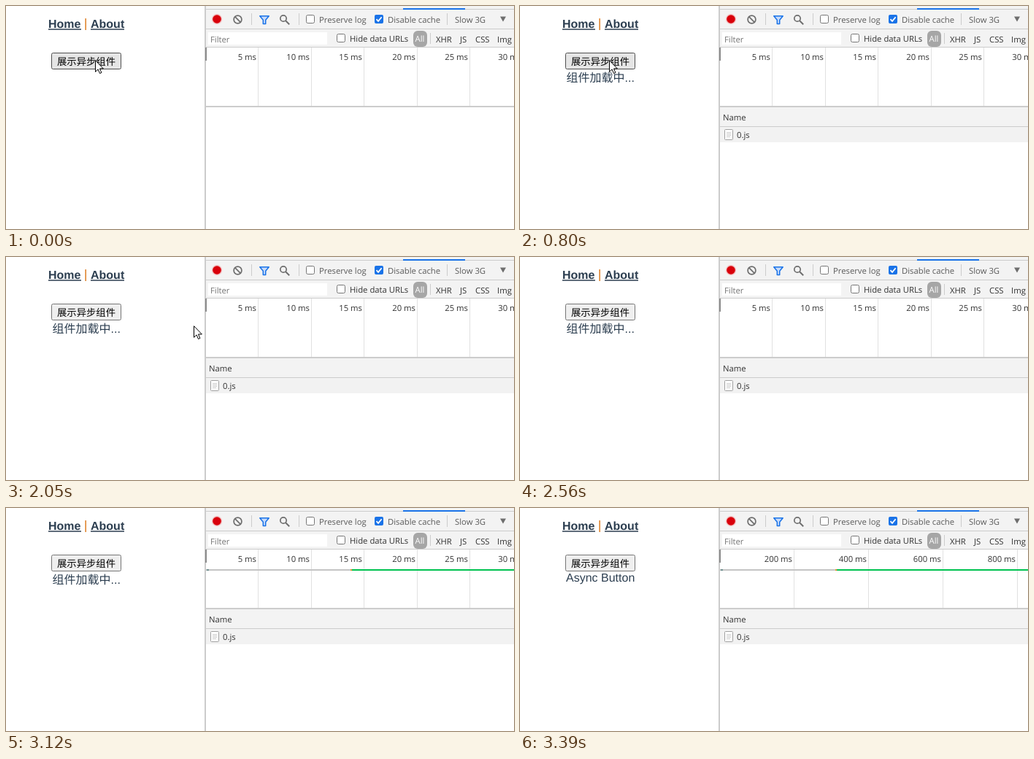
Recreate the animation shown at these times as an HTML page. Size 696 by 306 pixels, loop 4.74 s.

```html
<!DOCTYPE html>
<html lang="zh-CN">
<head>
<meta charset="utf-8">
<title>Async component</title>
<style>
  html, body { margin: 0; width: 100%; height: 100%; overflow: hidden; background: #fff; }
  svg { display: block; width: 696px; height: 306px; }
  text { white-space: pre; text-rendering: geometricPrecision; }
  .page { font: 16px "Liberation Sans", Arial, "Noto Sans CJK SC", "Noto Sans CJK", sans-serif; fill: #2c3e50; }
  .link { font-weight: bold; }
  .caption { font: 13.33px "Noto Sans CJK SC", "Noto Sans CJK", sans-serif; fill: #000; }
  .tools { font: 11.3px "Open Sans", "Noto Sans", sans-serif; fill: #333; }
  .soft { fill: #5a5a5a; }
  .sep { fill: #ccc; }
  .box { fill: #fff; stroke: #767676; }
</style>
</head>
<body>
<svg viewBox="0 0 696 306">
  <rect width="696" height="306" fill="#fff"/>

  <g class="page">
    <g class="link">
      <text x="58" y="30">Home</text>
      <text x="116" y="30">About</text>
      <path d="M58 32H103M116 32H162" stroke="#2c3e50" stroke-width="1.4"/>
    </g>
    <rect x="108.4" y="17" width="1.6" height="16" fill="#e08530"/>
    <rect id="button" x="62.5" y="64.5" width="95" height="22" rx="2"/>
    <text class="caption" x="70" y="80.5">展示异步组件</text>
    <text id="loading" x="63.5" y="104">组件加载中...</text>
    <text id="loaded" x="63" y="101">Async Button</text>
  </g>

  <g class="tools">
    <rect x="274" width="422" height="57" fill="#f3f3f3"/>
    <path class="sep" d="M274 4h422v1H274zM274 31h422v1H274zM274 56h422v1H274z"/>
    <rect x="544" y="3" width="85" height="2" fill="#1a73e8"/>

    <circle cx="289" cy="18" r="7.2" fill="#f3c4c4"/>
    <circle cx="289" cy="18" r="5.8" fill="#d9000b"/>
    <g fill="none" stroke="#6e6e6e" stroke-width="1.7">
      <circle cx="317.5" cy="18.5" r="5.4"/>
      <path d="M313.7 14.7l7.6 7.6"/>
      <circle cx="380" cy="17" r="4.2"/>
      <path d="M383.2 20.2l5 5" stroke-width="2"/>
    </g>
    <path d="M347.8 13.7h12.4l-4.5 5.6v5.2h-3.4v-5.2z" fill="#c5dafa" stroke="#1a73e8" stroke-width="1.5" stroke-linejoin="round"/>
    <path class="sep" d="M336 10h1v16h-1zM401 10h1v16h-1zM604 10h1v16h-1zM581 37h1v15h-1z"/>

    <rect class="box" x="411.5" y="12.5" width="11" height="11" rx="2"/>
    <text class="soft" x="429" y="22.5">Preserve log</text>
    <rect x="505" y="12" width="12" height="12" rx="2" fill="#1a73e8"/>
    <path d="M507.5 18.2l2.5 2.6 4.6-5.6" fill="none" stroke="#fff" stroke-width="1.8"/>
    <text class="soft" x="523" y="22.5">Disable cache</text>
    <text class="soft" x="615" y="22.5">Slow 3G</text>
    <path d="M677 14.5h8l-4 7z" fill="#6e6e6e"/>

    <rect x="277" y="36" width="163" height="17" fill="#fff"/>
    <text x="280" y="50" style="fill:#757575">Filter</text>
    <rect class="box" x="453.5" y="38.5" width="11" height="11" rx="2"/>
    <text x="471" y="48.5">Hide data URLs</text>
    <rect x="558" y="34" width="19" height="22" rx="6" fill="#a6a6a6"/>
    <text x="560.5" y="49" style="fill:#fff">All</text>
    <text x="589" y="49.5">XHR</text>
    <text x="622" y="49.5">JS</text>
    <text x="643" y="49.5">CSS</text>
    <text x="673" y="49.5">Img</text>

    <g id="ticks"></g>
    <g id="bar">
      <rect id="wait" x="274" y="84" height="2" fill="#c4c4c4"/>
      <rect x="275" y="84" width="3" height="2" fill="#6f8f8f"/>
      <rect id="mark" y="84" width="2" height="2" fill="#e8912d"/>
      <rect id="receive" y="84" height="2" fill="#00c250"/>
    </g>
    <rect x="273" y="57" width="2" height="18" fill="#8c8c8c"/>
    <rect x="274" y="137" width="422" height="2" fill="#ccc"/>

    <g id="request">
      <rect x="274" y="139" width="422" height="26" fill="#f3f3f3"/>
      <rect class="sep" x="274" y="165" width="422" height="1"/>
      <rect x="274" y="166" width="422" height="21" fill="#f2f2f2"/>
      <text x="278" y="157">Name</text>
      <rect x="280.5" y="169.5" width="11" height="14" rx="1" fill="#fff" stroke="#a0a0a0"/>
      <path d="M283 173.5h6M283 175.5h6M283 177.5h6M283 179.5h5" stroke="#ccc"/>
      <text x="297" y="181">0.js</text>
    </g>
  </g>
  <rect x="272" width="2" height="57" fill="#ccc"/>
  <rect x="272" y="75" width="2" height="231" fill="#ccc"/>
  <rect x="272" y="57" width="1" height="18" fill="#ccc"/>

  <path id="cursor" d="M.5 .7V16.3L4.1 12.9L6.5 18.5L8.9 17.5L6.5 12H11.4Z" fill="#fff" stroke="#000"/>
</svg>
<script>
  const LOOP = 4740;
  const STAGE_RIGHT = 696;
  const AXIS_LEFT = 273;
  const $ = id => document.getElementById(id);
  const set = (el, attrs) => {
    for (const key in attrs) el.setAttribute(key, attrs[key]);
  };
  const show = (id, on) => set($(id), { visibility: on ? "visible" : "hidden" });

  function add(tag, attrs) {
    const el = document.createElementNS("http://www.w3.org/2000/svg", tag);
    set(el, attrs);
    return $("ticks").appendChild(el);
  }

  const ticks = Array.from({ length: 6 }, () => ({
    line: add("rect", { y: 57, width: 1, height: 80, fill: "#e1e1e1" }),
    label: add("text", { y: 74, "text-anchor": "end" })
  }));

  const looks = {
    hover: { fill: "#e5e5e5", stroke: "#4f4f4f" },
    active: { fill: "#f5f5f5", stroke: "#858585" },
    rest: { fill: "#efefef", stroke: "#767676" }
  };

  // gap: pixels per tick, unit: ms per tick, split: where receiving starts
  function axisAt(t) {
    if (t < 3250) return { gap: 72.5, unit: 5, split: 472 };
    if (t < 3390) return { gap: 117, unit: 200, split: 455 };
    return { gap: 102, unit: 200, split: 432 };
  }

  // The pointer leaves the button in sampled steps of 120 ms.
  function cursorAt(t) {
    if (t < 2050) return [122, 74];
    if (t < 2200) return [257, 94];
    if (t >= 2560) return null;
    const k = (Math.floor((t - 2200) / 120) + 1) / 3;
    return [Math.round(257 + 355 * k), Math.round(94 + 154 * k)];
  }

  function draw(t) {
    const look = t >= 2050 ? "rest" : t >= 680 && t < 800 ? "active" : "hover";
    set($("button"), looks[look]);
    show("loading", t >= 800 && t < 3390);
    show("loaded", t >= 3390);
    show("request", t >= 800);
    show("bar", t >= 3120);

    const { gap, unit, split } = axisAt(t);
    ticks.forEach(({ line, label }, i) => {
      const x = Math.floor(AXIS_LEFT + gap * (i + 1));
      set(line, { x });
      set(label, { x: x - 2 });
      label.textContent = `${unit * (i + 1)} ms`;
    });
    set($("wait"), { width: split - 274 });
    set($("mark"), { x: split });
    set($("receive"), { x: split + 2, width: STAGE_RIGHT - split - 2 });

    const tip = cursorAt(t);
    show("cursor", tip);
    if (tip) set($("cursor"), { transform: `translate(${tip})` });
  }

  const start = performance.now();
  function frame() {
    draw((performance.now() - start) % LOOP);
    requestAnimationFrame(frame);
  }
  frame();
</script>
</body>
</html>
```
